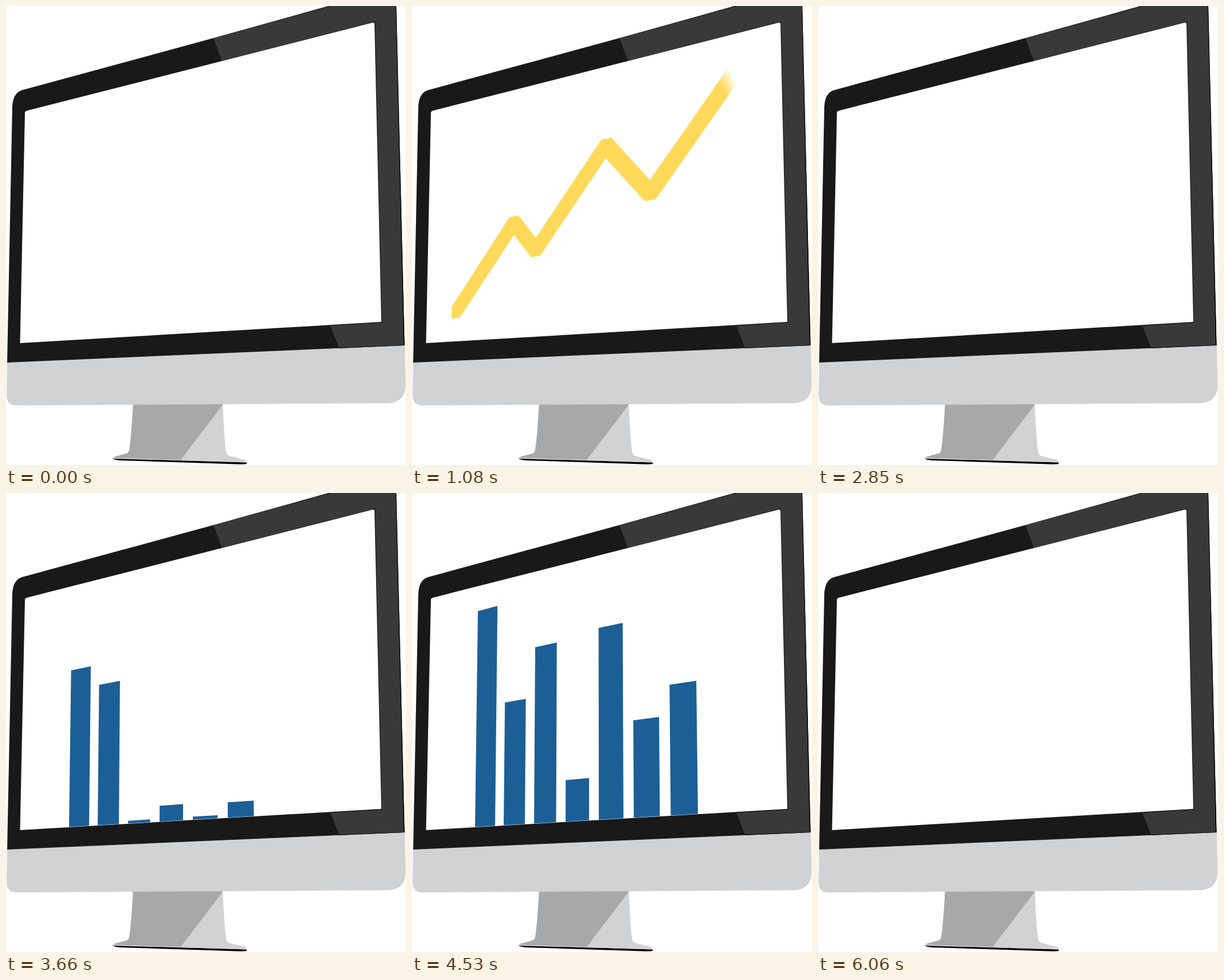
An HTML page that plays this animation: 698x802 px, repeating every 6.36 s.

```html
<!DOCTYPE html>
<html lang="en">
<head>
<meta charset="utf-8">
<title>Charts on a monitor</title>
<style>
  html, body { margin: 0; width: 100%; height: 100%; overflow: hidden; background: #fff; }
  svg { display: block; width: 698px; height: 802px; }
</style>
</head>
<body>
<svg viewBox="0 0 698 802">
  <defs>
    <linearGradient id="wipe" gradientUnits="userSpaceOnUse">
      <stop stop-color="#ffd95a"/>
      <stop offset="1" stop-color="#ffd95a" stop-opacity="0"/>
    </linearGradient>
  </defs>

  <!-- stand -->
  <path fill="#000" d="M186 790L420 797.5V800Q418 801 400 800.5L200 794Q187 793 186 790Z"/>
  <path fill="#d1d2d4" d="M222 690H378Q381 760 384 778Q385 784 389 786L417 793Q420 795 420 797.5L187 791Q185 789 190 787L210 782Q214 781 215 776Q219 750 222 690Z"/>
  <path fill="#a7a8aa" d="M222 690H378V697L305 793L190 789.5Q187 788 192 787L210 782Q214 781 215 776Q219 750 222 690Z"/>

  <!-- chin, bezel and screen -->
  <path fill="#d1d2d4" d="M2 622L696 592L697.5 660Q698 692 668 694L16 698Q1 697 1 679Z"/>
  <path fill="#191919" d="M11 176Q12 152 28 147L362 56L566 -1H681L695.5 593L2 623Z"/>
  <path fill="#000" d="M566 -1H681L695.5 593L581 598L566 557L656 552L644 28Z"/>
  <path fill="#393939" d="M362 56.5L566 .5V-1H680L694 592.5L581 597L566 558.5L656 553L644 27L377 96Z"/>
  <path fill="#fff" d="M33 187Q33 184 36 183L640 29Q643 28.500 643 31L655 552L24.500 589Z"/>

  <path id="line" fill="url(#wipe)" d="M69 526L170 369L186 366L216 405L330 234L348 230L415 304L556 102L575 98.500L576 122L425 338L406 341L338 266L224 436L208 439L178 400L83 545L69 546Z"/>
  <path id="bars" fill="#1c5f96"/>
</svg>

<script>
const LOOP = 6360;
const line = document.getElementById('line');
const barsPath = document.getElementById('bars');
const wipe = document.getElementById('wipe');

// Left and right foot, start of growth, then the three heights each bar holds.
const bars = [
  { x0: 110, x1: 145, start: 3528, heights: [377, 377, 230] },
  { x0: 160, x1: 197, start: 3420, heights: [258, 130, 130] },
  { x0: 213, x1: 251.5, start: 3659, heights: [308, 308, 308] },
  { x0: 268, x1: 309, start: 3603, heights: [71, 170, 170], delay: 30 },
  { x0: 326, x1: 369, start: 3659, heights: [335, 335, 335] },
  { x0: 387, x1: 432.5, start: 3640, heights: [170, 170, 240] },
  { x0: 451.5, x1: 499, start: 3730, heights: [276, 136, 136] }
];

const progress = (t, from, to) => Math.min(1, Math.max(0, (t - from) / (to - from)));
const easeOut = p => 1 - (1 - p) ** 3;
const easeInOut = p => p < .5 ? (2 * p) ** 2.2 / 2 : 1 - (2 - 2 * p) ** 2.2 / 2;

// The line is revealed by a soft slanted edge moving along a fixed normal.
function drawLine(t) {
  const shown = easeInOut(progress(t, 420, 1260)) - easeInOut(progress(t, 2010, 2850));
  const edge = -186 + 676 * shown;
  const set = (name, value) => wipe.setAttribute(name, value);
  set('x1', .9 * (edge - 13));
  set('y1', -.436 * (edge - 13));
  set('x2', .9 * (edge + 13));
  set('y2', -.436 * (edge + 13));
  line.style.display = t < 3150 ? '' : 'none';
}

function barHeight({ start, heights: [a, b, c], delay = 0 }, t) {
  const grow = easeOut(progress(t, start, start + 380));
  const second = easeOut(progress(t, 4500 + delay, 4740));
  const third = easeOut(progress(t, 5040, 5310));
  const leave = easeOut(progress(t, 5850, 6060));
  return (a * grow + (b - a) * second + (c - b) * third) * (1 - leave);
}

// Verticals lean towards the middle of the screen, the far side is taller.
const floorY = x => 588.5 - .0587 * (x - 25);
const topPoint = (x, h) => `${x + (310 - x) * 66e-6 * h} ${floorY(x) - h}`;

function barShape(bar, t) {
  const h = barHeight(bar, t);
  const { x0, x1 } = bar;
  return h < .05 ? '' :
    `M${x0} ${floorY(x0)}L${topPoint(x0, h)}L${topPoint(x1, h * 1.019)}L${x1} ${floorY(x1)}Z`;
}

function draw() {
  const t = performance.now() % LOOP;
  drawLine(t);
  barsPath.setAttribute('d', bars.map(bar => barShape(bar, t)).join(''));
  requestAnimationFrame(draw);
}
draw();
</script>
</body>
</html>
```
